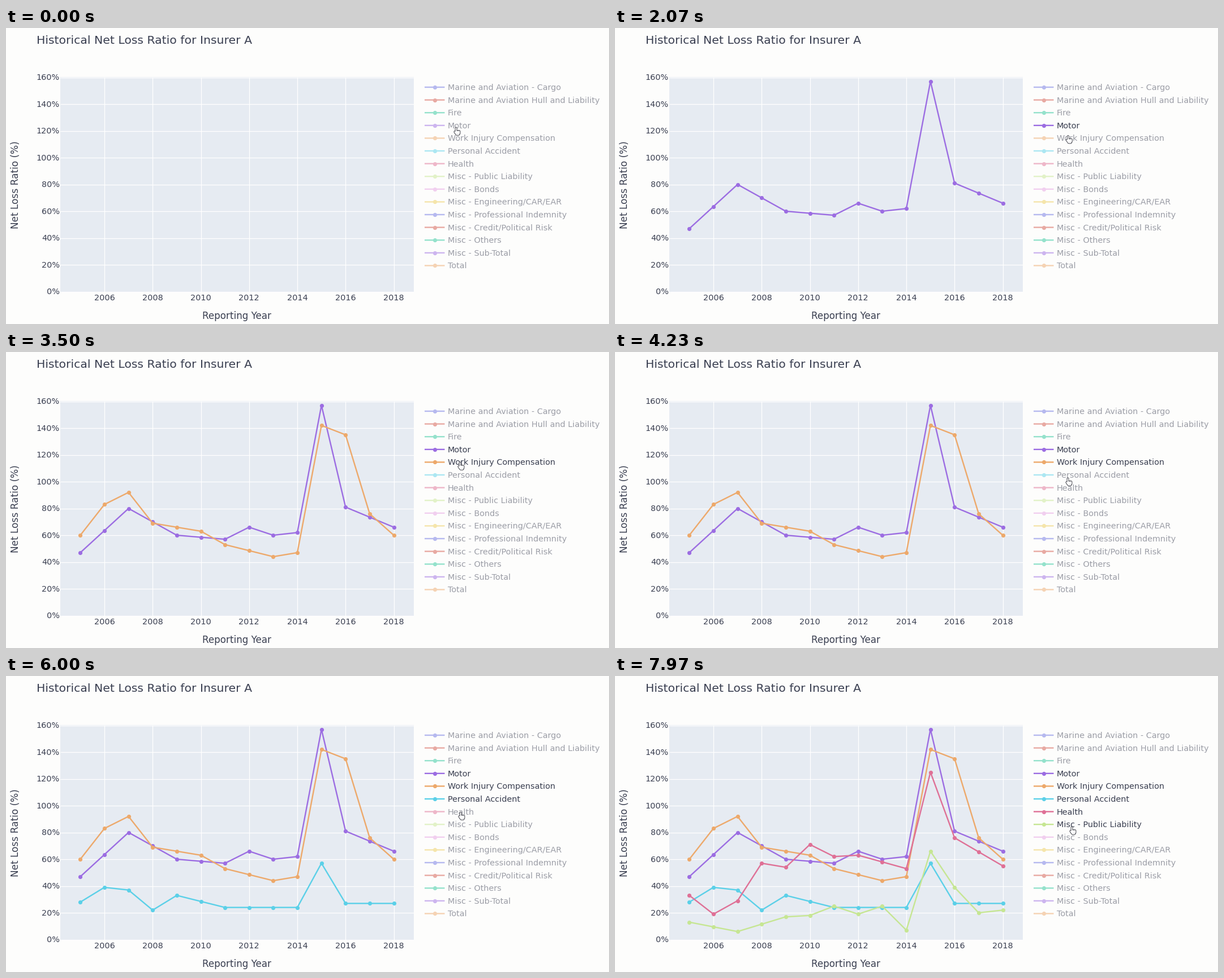
These frames come from a looping animation (1066x525 px, 8000 ms). A matplotlib script:

```python
import numpy as np
import matplotlib.pyplot as plt
from matplotlib.animation import FuncAnimation
from matplotlib.colors import to_rgb
from matplotlib.patches import Rectangle

W, H, DPI = 1066, 525, 100
LOOP_MS, STEP_MS, MOVE_MS = 8000, 40, 350
PT = 72 / DPI  # points per pixel
PAPER, PANEL, INK = "#fdfdfc", "#e6ebf2", "#3a3f51"

NAMES = [
    "Marine and Aviation - Cargo", "Marine and Aviation Hull and Liability",
    "Fire", "Motor", "Work Injury Compensation", "Personal Accident", "Health",
    "Misc - Public Liability", "Misc - Bonds", "Misc - Engineering/CAR/EAR",
    "Misc - Professional Indemnity", "Misc - Credit/Political Risk",
    "Misc - Others", "Misc - Sub-Total", "Total",
]
PALETTE = ["#6f75e2", "#d3574a", "#2dc79c", "#9c6de2", "#eda96b",
           "#5bd0e8", "#df7096", "#c6e693", "#e5a1e2", "#edcd5a"]

# name: (time shown in ms, turning points as years since 2005 -> loss ratio)
SERIES = {
    "Motor": (600, {0: 47, 2: 80, 4: 60, 6: 57, 7: 66, 8: 60, 9: 62,
                    10: 157, 11: 81, 13: 66}),
    "Work Injury Compensation": (2400, {0: 60, 1: 83, 2: 92, 3: 69, 5: 63, 6: 53,
                                        8: 44, 9: 47, 10: 142, 11: 135, 12: 76, 13: 60}),
    "Personal Accident": (4800, {0: 28, 1: 39, 2: 37, 3: 22, 4: 33, 6: 24, 9: 24,
                                 10: 57, 11: 27, 13: 27}),
    "Health": (6400, {0: 33, 1: 19, 2: 29, 3: 57, 4: 54, 5: 71, 6: 62, 7: 63,
                      9: 53, 10: 125, 11: 76, 13: 55}),
    "Misc - Public Liability": (7680, {0: 13, 2: 6, 4: 17, 5: 18, 6: 25, 7: 19,
                                       8: 25, 9: 7, 10: 66, 11: 39, 12: 20, 13: 22}),
}

POINTER_START = np.array([797, 183])
# pointer moves: (start ms, x, y)
MOVES = [(1800, 804, 202), (3600, 802, 230), (5200, 805, 248),
         (6300, 809, 269), (7000, 809, 274)]

plt.rcParams["font.family"] = "DejaVu Sans"
fig = plt.figure(figsize=(W / DPI, H / DPI), dpi=DPI, facecolor=PAPER)
ax = fig.add_axes([0, 0, 1, 1])
ax.set(xlim=(0, W), ylim=(H, 0))
ax.axis("off")


def faded(color):
    return tuple((np.array(to_rgb(color)) + to_rgb(PAPER)) / 2)


def year_x(year):
    return 174 + 42.63 * (year - 2006)


def ratio_y(percent):
    return 467.5 - 2.375 * percent


def label(x, y, text, size=14.35, **kw):
    return ax.text(x, y, text, fontsize=size * PT, color=INK, va="baseline", **kw)


def trace(xs, ys, color, zorder):
    line, = ax.plot(xs, ys, color=color, lw=2.4 * PT, zorder=zorder, snap=False,
                    solid_capstyle="butt", solid_joinstyle="round")
    return line


def dots(xs, ys, color, zorder):
    marks, = ax.plot(xs, ys, "o", color=color, ms=7.2 * PT, mew=0,
                     zorder=zorder, snap=False)
    return marks


def draw_axes():
    ax.add_patch(Rectangle((96, 87), 625, 380.5, fc=PANEL, lw=0, zorder=0))
    grid = dict(color="white", lw=1.3 * PT, zorder=1, solid_capstyle="butt")
    for year in range(2006, 2019, 2):
        x = year_x(year)
        ax.plot([x, x], [87, 467.5], **grid)
        label(x, 483.3, str(year), ha="center")
    for percent in range(0, 161, 20):
        y = ratio_y(percent)
        ax.plot([96, 721], [y, y], **grid)
        label(94.8, y + 4.9, f"{percent}%", ha="right")
    label(53.5, 27.5, "Historical Net Loss Ratio for Insurer A", 20.4)
    label(408, 515.6, "Reporting Year", 16.8, ha="center")
    label(22.5, 278, "Net Loss Ratio (%)", 17, ha="center",
          rotation=90, rotation_mode="anchor")


def draw_legend():
    rows = {}
    for i, name in enumerate(NAMES):
        y, color = 105 + 22.6 * i, PALETTE[i % len(PALETTE)]
        rows[name] = [(artist, shade, faded(shade)) for artist, shade in (
            (trace([740, 775.5], [y, y], color, 2), color),
            (dots([757.5], [y], color, 3), color),
            (label(780.7, y + 4.9, name), INK))]
        for artist, _, pale in rows[name]:
            artist.set_color(pale)
    return rows


def draw_series():
    years = np.arange(14)
    curves = {}
    for z, (name, (_, turns)) in enumerate(SERIES.items(), 4):
        color = PALETTE[NAMES.index(name)]
        ys = ratio_y(np.interp(years, list(turns), list(turns.values())))
        xs = year_x(2005 + years)
        curves[name] = trace(xs, ys, color, z), dots(xs, ys, color, z + 0.5)
    return curves


def draw_hand():
    """Round strokes, dark below and white above, that merge into one hand."""
    fingers = [(-1.4, -5.5, -1.4, 4)] + [(x, 0.2, x, 4) for x in (0.6, 2.6, 4.4)]
    strokes = fingers + [(-3.6, 1.2, -0.8, 5), (-0.3, 5.8, 3.4, 5.8)]
    path = np.array([p for x0, y0, x1, y1 in strokes
                     for p in ((x0, y0), (x1, y1), (np.nan, np.nan))])
    layers = [ax.plot([], [], color=color, lw=width * PT, zorder=z,
                      solid_capstyle="round")[0]
              for color, width, z in (("#44454d", 4, 20), ("white", 2, 21))]
    return path, layers


def pointer_at(t):
    pos = POINTER_START
    for start, *goal in MOVES:
        u = np.clip((t - start) / MOVE_MS, 0, 1)
        pos = pos + (np.array(goal) - pos) * u * u * (3 - 2 * u)
    return pos


draw_axes()
legend = draw_legend()
curves = draw_series()
hand_path, hand_layers = draw_hand()


def update(frame):
    t = frame * STEP_MS
    for name, (start, _) in SERIES.items():
        shown = t >= start
        for artist in curves[name]:
            artist.set_visible(shown)
        for artist, full, pale in legend[name]:
            artist.set_color(full if shown else pale)
    for layer in hand_layers:
        layer.set_data(*(hand_path + pointer_at(t)).T)
    return []


anim = FuncAnimation(fig, update, frames=LOOP_MS // STEP_MS, interval=STEP_MS,
                     init_func=lambda: update(0), repeat=True, repeat_delay=0)
plt.show()
```
